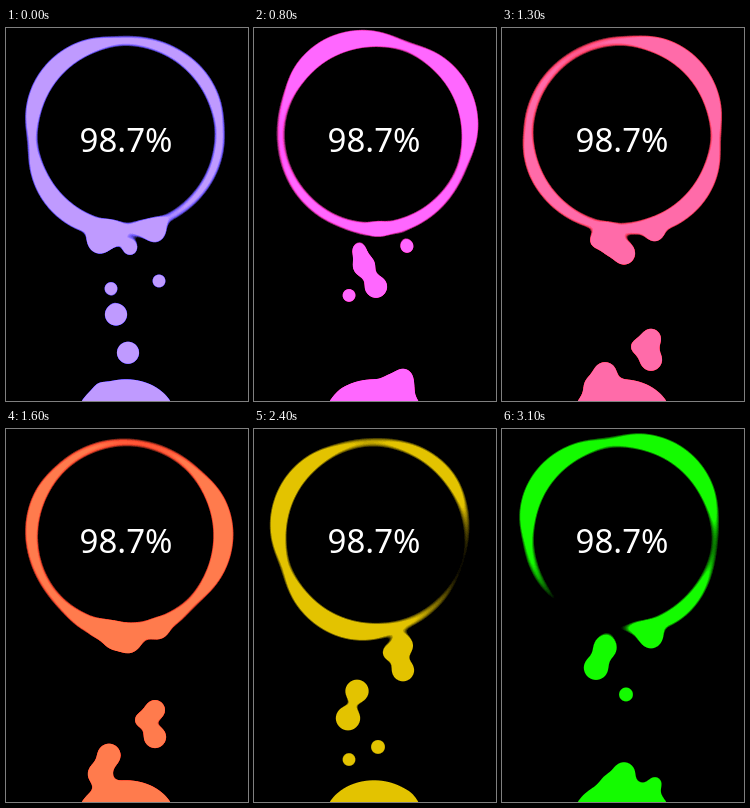
Recreate the animation shown at these times as an HTML page with a canvas. Size 242 by 373 pixels, loop 3.2 s.

```html
<!DOCTYPE html>
<html lang="en">
<head>
<meta charset="utf-8">
<title>Charging</title>
<style>
  html, body { margin: 0; width: 100%; height: 100%; overflow: hidden; background: #000; }
  #stage { position: absolute; left: 0; top: 0; width: 242px; height: 373px; overflow: hidden; background: #000; }
  canvas { position: absolute; left: -40px; top: -40px; }
  #ring { filter: blur(8px); }
  #drops { filter: blur(5px); }
  #label {
    position: absolute; left: 0; top: 88px; width: 240px; text-align: center;
    font: 500 33px/47px "Noto Sans", "Open Sans", sans-serif; color: #fff;
  }
</style>
</head>
<body>
<div id="stage">
  <canvas id="ring"></canvas>
  <canvas id="drops"></canvas>
</div>
<div id="label">98.7%</div>
<script>
const PAD = 40, W = 242, H = 373, LOOP = 3200, STEP = 100;
const GREEN = '#00ff6f';
const CX = 120, CY = 106.5, HALF = 100, HOLE = 88;
const START_Y = 372, RISE = 180;

// Each stream gives the phase of its i-th bubble at a moment, and its period
const STREAMS = [
  {
    moment: 0,
    phase: i => .615 - .0275 * i * i,
    period: i => 5.1 - .19 * i * i,
    x: [153, 105, 110, 122, 95],
    size: i => i === 2 || i === 3 ? 24 : 16
  },
  {
    moment: 2,
    phase: i => .66 - .04 * i - .007 * i * i,
    period: i => 2.9 + .19 * i,
    x: [149, 136, 149, 103, 94, 124],
    size: i => i % 4 === 1 ? 17 : 22 + i
  }
];

const stage = document.getElementById('stage');
const ring = layer('ring'), drops = layer('drops');

function layer(id) {
  const canvas = document.getElementById(id);
  canvas.width = W + 2 * PAD;
  canvas.height = H + 2 * PAD;
  const ctx = canvas.getContext('2d');
  ctx.translate(PAD, PAD);
  return ctx;
}

const mix = (a, b, k) => a + (b - a) * k;

// cubic-bezier(.42, 0, .58, 1)
function easeInOut(x) {
  let lo = 0, hi = 1, s = .5;
  for (let i = 0; i < 24; i++) {
    s = (lo + hi) / 2;
    const u = 1 - s;
    const at = 1.26 * s * u * u + 1.74 * s * s * u + s * s * s;
    if (at < x) lo = s; else hi = s;
  }
  return s * s * (3 - 2 * s);
}

function clear(ctx) {
  ctx.clearRect(-PAD, -PAD, W + 2 * PAD, H + 2 * PAD);
}

function oval(ctx, x, y, rx, ry = rx) {
  ctx.beginPath();
  ctx.ellipse(x, y, rx, ry, 0, 0, 2 * Math.PI);
  ctx.fill();
}

// Square with elliptical corners: radii as fractions, from top left clockwise
function softSquare(ctx, h, v) {
  const fit = 2 * HALF / Math.max(1, h[0] + h[1], h[2] + h[3], v[0] + v[3], v[1] + v[2]);
  const signs = [[-1, -1], [1, -1], [1, 1], [-1, 1]];
  ctx.beginPath();
  signs.forEach(([sx, sy], i) => {
    const rx = h[i] * fit, ry = v[i] * fit;
    const from = Math.PI * (1 + i / 2);
    ctx.ellipse(sx * (HALF - rx), sy * (HALF - ry), rx, ry, 0, from, from + Math.PI / 2);
  });
  ctx.closePath();
  ctx.fill();
}

function drawRing(t) {
  const k = (t / 3.2) ** 3;
  clear(ring);
  ring.save();
  ring.translate(CX, CY);
  ring.rotate((144 * t - 5) * Math.PI / 180);
  ring.fillStyle = GREEN;
  softSquare(ring,
    [.42, mix(.5, .58, k), .52, .4],
    [.42, mix(.46, .43, k), mix(.49, .6, k), .42]);
  ring.restore();
  ring.fillStyle = '#000';
  oval(ring, CX, CY, HOLE);
}

function drawBubble(x, size, p) {
  const y = START_Y - easeInOut(p) * (RISE - size / 2);
  drops.globalAlpha = p < .9 ? 1 : 1 - .9 * easeInOut((p - .9) * 10);
  oval(drops, x, y, size / 2);
}

function drawDrops(t) {
  clear(drops);
  drops.globalAlpha = 1;
  drops.fillStyle = GREEN;
  oval(drops, CX, 391, 50, 40);
  for (const { moment, phase, period, x, size } of STREAMS) {
    x.forEach((left, i) => {
      const p = (phase(i) + (t - moment) / period(i) + 1) % 1;
      drawBubble(left, size(i), p);
    });
  }
}

function frame(now) {
  const t = Math.floor((now % LOOP) / STEP) * STEP / 1000;
  drawRing(t);
  drawDrops(t);
  stage.style.filter = `contrast(12) hue-rotate(${137 + 70 * t}deg)`;
  requestAnimationFrame(frame);
}

frame(0);
</script>
</body>
</html>
```
